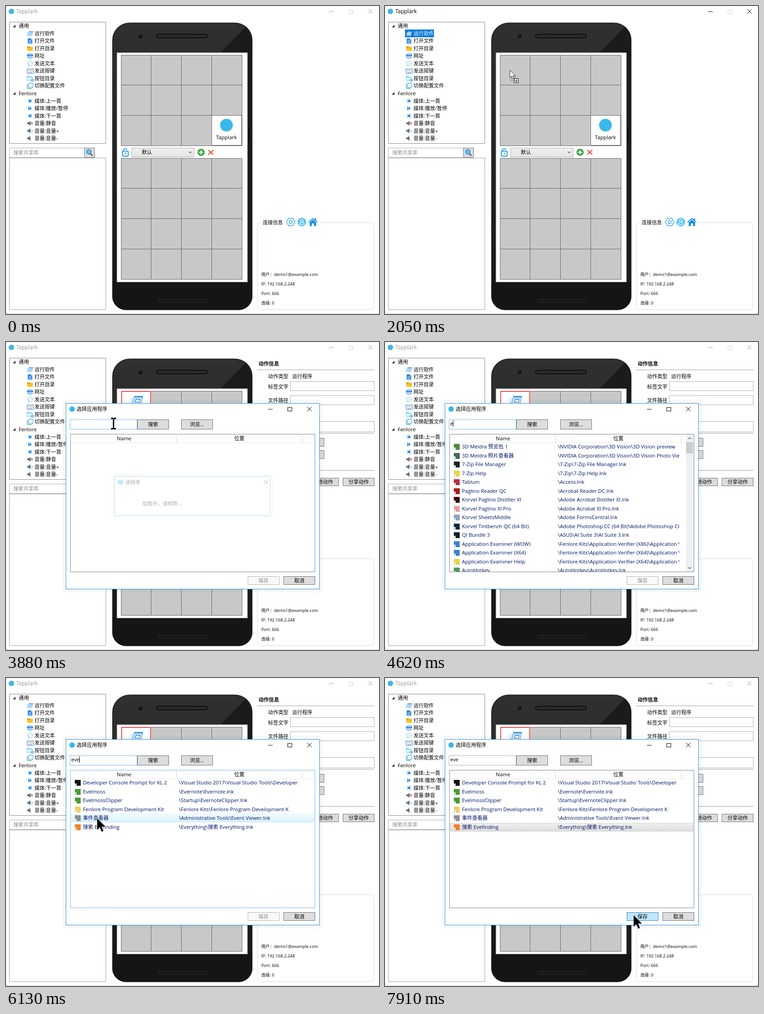
Animation of 824x680 px, one loop 8000 ms. Source, as an HTML page with a canvas:

```html
<!DOCTYPE html>
<html lang="zh">
<head>
<meta charset="utf-8">
<title>Tapplark</title>
<style>
html, body { margin: 0; width: 100%; height: 100%; overflow: hidden; background: #fff; }
canvas { display: block; }
</style>
</head>
<body>
<canvas id="stage" width="824" height="680"></canvas>
<script>
const c = document.getElementById('stage').getContext('2d');
const LOOP = 8000, BLUE = '#1296db', SKY = '#3ab8e8';
const FONT = '"Open Sans", "Noto Sans CJK SC", "Noto Sans CJK", sans-serif';

// Drawing helpers
function text(s, x, y, color = '#000', size = 11.3, align = 'left', weight = 400) {
  c.font = `${weight} ${size}px ${FONT}`;
  c.textAlign = align;
  c.fillStyle = color;
  c.fillText(s, x, y + 4);
}
function box(x, y, w, h, fill, stroke) {
  if (fill) { c.fillStyle = fill; c.fillRect(x, y, w, h); }
  if (stroke) { c.strokeStyle = stroke; c.lineWidth = 1; c.strokeRect(x + .5, y + .5, w - 1, h - 1); }
}
function line(color, width, ...p) {
  c.strokeStyle = color;
  c.lineWidth = width;
  c.beginPath();
  for (let i = 0; i < p.length; i += 2) c.lineTo(p[i], p[i + 1]);
  c.stroke();
}
function poly(fill, ...p) {
  c.fillStyle = fill;
  c.beginPath();
  for (let i = 0; i < p.length; i += 2) c.lineTo(p[i], p[i + 1]);
  c.closePath();
  c.fill();
}
function disc(x, y, r, fill, stroke, width = 1) {
  c.beginPath();
  c.arc(x, y, r, 0, 7);
  if (fill) { c.fillStyle = fill; c.fill(); }
  if (stroke) { c.strokeStyle = stroke; c.lineWidth = width; c.stroke(); }
}
function round(x, y, w, h, r, fill, stroke, width = 1) {
  c.beginPath();
  c.roundRect(x, y, w, h, r);
  if (fill) { c.fillStyle = fill; c.fill(); }
  if (stroke) { c.strokeStyle = stroke; c.lineWidth = width; c.stroke(); }
}
function fade(y0, y1, a, b) {
  const g = c.createLinearGradient(0, y0, 0, y1);
  g.addColorStop(0, a);
  g.addColorStop(1, b);
  return g;
}
function at(x, y, scale, draw) {
  c.save();
  c.translate(x, y);
  c.scale(scale, scale);
  draw();
  c.restore();
}
function button(label, x, y, w, h, mode = 'on') {
  const [fill, edge, ink] = {
    on: ['#ddd', '#707070', '#000'],
    off: ['#f9f9f9', '#adb2b5', '#838383'],
    hover: ['#bee6fd', '#3c7fb1', '#000']
  }[mode];
  box(x, y, w, h, fill, edge);
  text(label, x + w / 2, y + h / 2, ink, 11.3, 'center');
}
function caption(x, y, color, maxColor, gap) {
  line(color, 1, x - 5, y + .5, x + 5, y + .5);
  box(x + gap - 5, y - 4, 10, 9, null, maxColor);
  const k = x + 2 * gap;
  line(color, 1, k - 5, y - 5, k + 5, y + 5);
  line(color, 1, k + 5, y - 5, k - 5, y + 5);
}

// Icons, each centred on the local origin
function runIcon() {
  poly('#4a9ce0', -3, -5, 7, -5, 4.5, 5, -6, 5);
  poly('#eaf5fd', -2.8, -3, 5.7, -3, 4, 4.2, -4.9, 4.2);
  poly('#4a9ce0', -1.6, -1.8, 4.2, -1.8, 3.2, 2.8, -2.9, 2.8);
  poly('#eaf5fd', -1, -.6, 3.2, -.6, 2.6, 2, -1.7, 2);
  line('#a5d4f4', .8, -9, -1.5, -4.4, -1.5);
  line('#a5d4f4', .8, -8, 1, -5.2, 1);
  line('#a5d4f4', .8, -9, 3.5, -6, 3.5);
}
function speaker() {
  poly('#5f6f7c', -6, -2, -3, -2, 1, -5.5, 1, 5.5, -3, 2, -6, 2);
}
const icons = {
  1: runIcon,
  2() {
    poly('#2f86dc', -5, -6, 2, -6, 5, -3, 5, 6, -5, 6);
    poly('#a9d4f7', 2, -6, 5, -3, 2, -3);
    for (const y of [-1, 1.5, 4]) line('#cfe6fa', 1, -3, y, 3, y);
  },
  3() {
    poly('#e89a00', -6, -5, -1, -5, 0, -3, 6, -3, 6, 5, -6, 5);
    poly('#ffbe1a', -6, -1.5, 6.5, -1.5, 6, 5, -6, 5);
  },
  4() {
    disc(0, 0, 6, '#e6f4ff', '#2b86cf');
    box(-7, -3, 14, 6, '#2b86cf');
    text('www', 0, -1.7, '#fff', 6, 'center', 700);
  },
  5() {
    round(-6, -5, 12, 9, 4.5, '#fff', '#6cc0ec');
    line('#6cc0ec', 1, -3, 4, -4, 6, 0, 4);
    for (const x of [-3, 0, 3]) disc(x, -.5, .8, '#6cc0ec');
  },
  6() {
    box(-7, -5, 15, 11, '#f4f9ff', '#5d86b8');
    for (const y of [-2.5, -.5]) for (let x = -5; x < 6; x += 2) box(x, y, 1, 1, '#5d86b8');
    line('#5d86b8', 1, -4, 3.5, 5, 3.5);
  },
  7() {
    poly('#8fd0f2', -7, -6, -2, -6, 0, -4, 6, -4, 6, 5, -7, 5);
    box(-6, -2, 11, 6, '#dff2fd');
    disc(5, 4, 3, '#3aa5e0');
    line('#fff', 1, 3.2, 4, 6.8, 4);
    line('#fff', 1, 5, 2.2, 5, 5.8);
  },
  8() {
    round(-6, -3, 9, 9, 1, '#fff', BLUE);
    round(-4, -6, 10, 10, 1, '#fff', BLUE);
  },
  10() { box(-3, -4, 2, 8, '#1e88e5'); poly('#1e88e5', 3, -4, 3, 4, -2, 0); },
  11() { box(-4, -4, 2, 8, '#1e88e5'); poly('#1e88e5', -1, -4, -1, 4, 4, 0); },
  12() { poly('#1e88e5', -3, -4, -3, 4, 2, 0); box(1, -4, 2, 8, '#1e88e5'); },
  13() { speaker(); line('#e0392b', 1.4, 2, -2, 6, 2); line('#e0392b', 1.4, 6, -2, 2, 2); },
  14() {
    speaker();
    for (const r of [2.5, 4.5]) {
      c.beginPath(); c.arc(1, 0, r, -1, 1);
      c.strokeStyle = '#5cb8ea'; c.lineWidth = 1; c.stroke();
    }
  },
  15: speaker
};

const tree = ['通用', '运行软件', '打开文件', '打开目录', '网址', '发送文本', '发送按键', '按钮目录',
  '切换配置文件', 'Fenlore', '媒体:上一首', '媒体:播放/暂停', '媒体:下一首', '音量:静音', '音量:音量+', '音量:音量-'];

const apps = [
  ['#4f8a3c', '3D Meldra 预览包 1', '\\NVIDIA Corporation\\3D Vision\\3D Vision preview'],
  ['#3c6b5a', '3D Meldra 照片查看器', '\\NVIDIA Corporation\\3D Vision\\3D Vision Photo Viewer'],
  ['#222', '7-Zip File Manager', '\\7-Zip\\7-Zip File Manager.lnk'],
  ['#e8d34a', '7-Zip Help', '\\7-Zip\\7-Zip Help.lnk'],
  ['#b5303a', 'Tablum', '\\Access.lnk'],
  ['#a81d14', 'Paglino Reader QC', '\\Acrobat Reader DC.lnk'],
  ['#3a0d14', 'Korvel Paglino Distiller XI', '\\Adobe Acrobat Distiller XI.lnk'],
  ['#e5a09a', 'Korvel Paglino XI Pro', '\\Adobe Acrobat XI Pro.lnk'],
  ['#8fa3c0', 'Korvel SheetsMiddle', '\\Adobe FormsCentral.lnk'],
  ['#062a44', 'Korvel Tintbench QC (64 Bit)', '\\Adobe Photoshop CC (64 Bit)\\Adobe Photoshop CC (64 Bit).lnk'],
  ['#10232b', 'QI Bundle 3', '\\ASUS\\AI Suite 3\\AI Suite 3.lnk'],
  ['#3b82cc', 'Application Examiner (WOW)', '\\Fenlore Kits\\Application Verifier (X86)\\Application Verifier (WOW).lnk'],
  ['#3b82cc', 'Application Examiner (X64)', '\\Fenlore Kits\\Application Verifier (X64)\\Application Verifier (X64).lnk'],
  ['#e8d34a', 'Application Examiner Help', '\\Fenlore Kits\\Application Verifier (X64)\\Application Verifier Help.lnk'],
  ['#4f9a58', 'AutoHotkey', '\\AutoHotkey\\AutoHotkey.lnk']
];
const matches = [
  ['#111', 'Developer Console Prompt for KL 2', '\\Visual Studio 2017\\Visual Studio Tools\\Developer'],
  ['#4a9c2f', 'Evelmoss', '\\Evernote\\Evernote.lnk'],
  ['#4a9c2f', 'EvelmossClipper', '\\Startup\\EvernoteClipper.lnk'],
  ['#f0cf63', 'Fenlore Program Development Kit', '\\Fenlore Kits\\Fenlore Program Development K'],
  ['#8a9097', '事件查看器', '\\Administrative Tools\\Event Viewer.lnk'],
  ['#f08228', '搜索 Evefinding', '\\Everything\\搜索 Everything.lnk']
];

function drawTitle(active) {
  disc(12, 12, 6, SKY);
  text('Tapplark', 23, 12, active ? '#000' : '#999', 11.8);
  caption(719, 12, active ? '#000' : '#a0a0a0', '#d8d8d8', 43);
  line('#c8c8c8', 1, 0, 679.5, 824, 679.5);
}

function drawTree(selected) {
  box(7, 35, 214, 269, null, '#828790');
  tree.forEach((name, i) => {
    const y = 44.2 + i * 16.53, head = i % 9 === 0;
    if (head) {
      poly('#333', 21, y - 3, 21, y + 3, 15, y + 3);
      text(name, 28, y, '#000', 11.4);
      return;
    }
    const on = selected && i === 1;
    if (on) box(44, 52, 64, 17, '#0078d7');
    at(53, y, 1, icons[i]);
    text(name, 63, y, on ? '#fff' : '#000', 11.2);
  });
  box(7, 335, 214, 336, null, '#a0a3a8');
  box(7, 313, 167, 22, '#fff', '#abadb3');
  text('搜索共享库', 16, 324, '#8c8c8c', 11.2);
  box(173, 313, 23, 22, '#ddd', '#707070');
  line('#37474f', 2.4, 186.5, 326, 191, 330.5);
  disc(183, 322, 5, '#6cc3f5', '#1976d2', 1.5);
}

function cells(y, rows) {
  const s = 66.7;
  for (let r = 0; r < rows; r++) for (let k = 0; k < 4; k++) {
    const x0 = Math.round(253.5 + k * s), y0 = Math.round(y + r * s);
    box(x0, y0, 68, 68, '#c8c8c8', '#666');
  }
}

function drawPhone(dropped) {
  round(235, 37, 309, 634, [38, 38, 30, 30], fade(37, 671, '#303030', '#141414'), '#555', 1);
  c.save();
  c.clip();
  poly('#1b1b1b', 538, 37, 560, 37, 560, 680, 534, 680, 534, 103, 474, 103);
  poly('#151515', 230, 609, 550, 609, 550, 680, 230, 680);
  c.restore();
  round(236, 38, 307, 632, [37, 37, 29, 29], null, '#1a1a1a', 1);
  round(333, 62.5, 112, 8, 4, '#2a2a2a', '#050505', 1.6);
  disc(297, 67, 4, '#0b0b12');
  disc(297, 66.5, 1.4, '#3a4468');
  round(337, 647.5, 109, 7, 3.5, '#171717', '#2c2c2c', 1);
  line('#050505', 1.5, 537, 268, 537, 299);
  round(245, 103, 288.5, 506.5, 0, '#fff', '#8c8c8c');
  cells(107.5, 3);
  cells(335.5, 4);
  box(454, 241, 67, 67, '#fff', '#666');
  disc(487, 263, 14, SKY);
  text('Tapplark', 487, 289.5, '#000', 11.6, 'center');
  if (dropped) {
    box(254, 108, 67, 66, '#fff');
    c.strokeStyle = '#ee4a45';
    c.lineWidth = 2;
    c.strokeRect(255.5, 109, 64, 64);
    at(289.5, 128.5, 1.9, runIcon);
  }

  round(257, 320.5, 13, 11, 1, '#fff', BLUE, 1.8);
  line(BLUE, 1.8, 263.5, 324, 263.5, 328);
  c.beginPath();
  c.arc(263, 318.5, 3.6, Math.PI, Math.PI * 1.95);
  c.lineWidth = 1.8;
  c.stroke();
  line(BLUE, 1.8, 259.4, 318, 259.4, 321);
  box(277, 313, 139, 21, fade(313, 334, '#f0f0f0', '#e4e4e4'), '#acacac');
  text('默认', 300, 322.5, '#000', 11.3);
  line('#555', 1.2, 404, 321.5, 407, 324.5, 410, 321.5);
  disc(431, 323, 8, '#43a94b');
  line('#fff', 2.2, 426.5, 323, 435.5, 323);
  line('#fff', 2.2, 431, 318.5, 431, 327.5);
  line('#ea4030', 2, 447, 318, 458, 328);
  line('#ea4030', 2, 458, 318, 447, 328);
}

function drawInfo() {
  round(555.5, 478.5, 257, 192, 3, null, '#d5dfe5');
  box(562, 470, 130, 16, '#fff');
  text('连接信息', 567, 477.5, '#000', 11.2);
  c.beginPath();
  for (let i = 0; i <= 48; i++) {
    const a = i * Math.PI / 24, r = 8.6 + .9 * Math.tanh(3 * Math.cos(a * 6));
    c.lineTo(629 + r * Math.cos(a), 477 + r * Math.sin(a));
  }
  c.strokeStyle = '#2fa8e6';
  c.lineWidth = 1.4;
  c.stroke();
  disc(629, 477, 3.2, null, '#2fa8e6', 1.4);
  disc(653.5, 477, 9.6, '#5cc4f0');
  disc(653.5, 474, 3, null, '#fff', 1.2);
  c.beginPath();
  c.arc(653.5, 482.5, 5, Math.PI, 0);
  c.closePath();
  c.stroke();
  poly('#1490dc', 671, 478, 678, 472, 685, 478, 685, 486, 680.5, 486, 680.5, 480, 675.5, 480, 675.5, 486, 671, 486);
  line('#1490dc', 2, 668.5, 477.5, 678, 469, 687.5, 477.5);
  box(682, 469, 3, 5, '#1490dc');
  ['用户：demo1@example.com', 'IP: 192.168.2.248', 'Port: 666', '连接: 0']
    .forEach((s, i) => text(s, 564, 592 + i * 21.1, '#000', 9.35));
}

function drawPanel() {
  text('动作信息', 558, 47.5, '#000', 11.3, 'left', 700);
  for (const y of [61.5, 201.5, 283.5]) line('#a0a0a0', 1, 554, y, 814, y);
  text('运行程序', 632, 75.5, '#000', 11.2);
  [['动作类型', 75.5], ['标签文字', 98.5], ['文件路径', 129], ['附加参数', 187]]
    .forEach(([s, y]) => text(s, 579, y, '#000', 11.2));
  for (const [y, h] of [[87, 21], [118, 21], [175, 24]]) box(628, y, 186, h, '#fff', '#abadb3');
  button('选择...', 628, 144, 34, 17);
  box(561, 212, 60, 60, '#fff', '#b5b8bc');
  at(592, 231, 1.9, runIcon);
  button('更改图标...', 628, 212, 75, 19);
  button('去除图标', 628, 239, 75, 19);
  button('保存/结束编辑', 563, 300, 93, 18);
  button('删除动作', 665, 300, 70, 18);
  button('分享动作', 744, 300, 70, 18);
}

// White window with a soft band of shadow around it
function frameBox(x, y, w, h, edge, shade) {
  round(x - 3.5, y - 3.5, w + 7, h + 7, 6, null, `rgba(0,0,0,${shade})`, 7);
  box(x, y, w, h, '#fff', edge);
}

function drawRows(rows, hover, picked) {
  c.save();
  c.beginPath();
  c.rect(143, 222, 538, 285);
  c.clip();
  rows.forEach(([color, name, path], i) => {
    const y = 231 + i * 19.5, top = Math.round(y - 9);
    if (i === hover || i === picked) {
      const [a, b, edge] = i !== picked ? ['#f5fcff', '#d5f1ff', '#d3effc']
        : i === hover ? ['#eaf9ff', '#c9edfd', '#98ddfb'] : ['#f0f0f0', '#dcdcdc', '#d5d5d5'];
      box(144, top, 537, 19, fade(top, top + 19, a, b), edge);
    }
    box(152, Math.round(y) - 6, 13, 13, color);
    box(151, y + 2, 5, 5, '#fff');
    line('#2a78c8', 1, 152, y + 6, 155, y + 3);
    for (const [s, x, w] of [[name, 170, 204], [path, 382, 268]]) {
      c.save();
      c.beginPath();
      c.rect(x, y - 10, w, 20);
      c.clip();
      text(s, x, y, '#001466', 11.35);
      c.restore();
    }
  });
  c.restore();
  if (rows.length > 14) {
    box(665, 204, 17, 303, '#f0f0f0');
    box(665, 221, 15, 25, '#cdcdcd');
    line('#606060', 1.2, 669.5, 214.5, 673, 211, 676.5, 214.5);
    line('#606060', 1.2, 669.5, 497, 673, 500.5, 676.5, 497);
  }
}

function drawPicker(t, mouse) {
  const active = t >= 3880, picked = t >= 6970, ink = active ? '#000' : '#999';
  frameBox(132, 135, 561, 411, active ? '#2f8fd8' : '#a6a6a6', t < 2470 ? .08 : .03);
  disc(146, 148, 6, SKY);
  text('选择应用程序', 156, 148, ink, 11.3);
  caption(584, 148, ink, ink, 43);

  const over = (x, y, w, h) => mouse && mouse.x >= x && mouse.x < x + w && mouse.y >= y && mouse.y < y + h;
  const focused = t >= 3010 && !picked;
  box(141, 171, 149, 22, '#fff', focused ? '#7eb4ea' : '#abadb3');
  const query = 'eve'.slice(0, (t >= 4410) + (t >= 4930) + (t >= 5590));
  text(query, 144, 180, '#000', 11.35);
  if (query && !picked) {
    const x = 144.5 + Math.round(c.measureText(query).width);
    line('#000', 1, x, 173, x, 187);
  }
  button('搜索', 290, 171, 70, 22);
  button('浏览...', 387, 171, 70, 22);

  const inList = t > 5590 && over(142, 203, 541, 305);
  box(142, 203, 541, 305, null, inList ? '#7eb4ea' : '#828790');
  text('Name', 261, 212.5, '#000', 11.35, 'center');
  text('位置', 515.5, 212.5, '#000', 11.3, 'center');
  line('#d5d5d5', 1, 376.5, 205, 376.5, 222);
  line('#d5d5d5', 1, 654.5, 205, 654.5, 222);
  line('#e8e8e8', 1, 143, 222.5, 682, 222.5);

  if (t >= 4090) {
    const rows = t < 5050 ? apps : t < 5590 ? [apps[0], ...matches] : matches;
    const hover = inList ? Math.floor((mouse.y - 221.5) / 19.5) : -1;
    drawRows(rows, hover, picked ? 5 : -1);
  }
  button('保存', 534, 517, 70, 19, !picked ? 'off' : over(534, 517, 70, 19) ? 'hover' : 'on');
  button('取消', 613, 517, 70, 19);
  for (let i = 0; i < 3; i++) for (let k = 0; k <= i; k++) box(689 - k * 3, 537 + i * 3, 1, 1, '#aaa');
}

function drawLoading(opening) {
  const ink = opening ? '#777' : '#000';
  frameBox(239, 296, 345, 88, opening ? '#999' : '#2f8fd8', opening ? .5 : .04);
  disc(253, 309.5, 6, SKY);
  text('请稍等', 263, 309.5, ink, 11.2);
  text('加载中，请稍等...', 301, 357, ink, 11.2);
  if (opening) return;
  line(ink, 1, 570, 305, 579, 314);
  line(ink, 1, 579, 305, 570, 314);
}

// Pointer legs: start, end, steps, from x,y, to x,y
const legs = [
  [100, 900, 9, 649, 673, 74, 62],
  [1000, 1100, 2, 74, 62, 71, 57],
  [1415, 2050, 7, 71, 57, 276, 142],
  [2790, 3010, 3, 275, 141, 238, 180],
  [5698, 6130, 5, 240, 185, 201, 309],
  [6210, 6340, 2, 201, 309, 203, 313],
  [6430, 6540, 2, 203, 313, 203, 323],
  [7170, 7910, 8, 203, 323, 549, 523]
];
function pointer(t) {
  if (t < 100 || (t >= 4410 && t < 5698)) return null;
  const [t0, t1, n, x0, y0, x1, y1] = legs.filter(l => l[0] <= t).pop();
  const step = Math.floor((t - t0) / (t1 - t0) * (n - 1) + 1e-6);
  const p = Math.min(1, (step + 1) / n), e = p * p * (3 - 2 * p);
  return { x: Math.round(x0 + (x1 - x0) * e), y: Math.round(y0 + (y1 - y0) * e) };
}

function arrow(fill, edge, width) {
  const p = [0, 0, 0, 16.5, 3.8, 13, 6.3, 19, 9, 17.8, 6.5, 12, 11.8, 12];
  c.lineJoin = 'miter';
  poly(fill, ...p);
  c.strokeStyle = edge;
  c.lineWidth = width;
  c.stroke();
}
function drawPointer(t, { x, y }) {
  if (t >= 1310 && t < 2260) {
    c.setLineDash([1, 1]);
    box(x + 2, y + 14, 11, 9, null, '#444');
    c.setLineDash([]);
    at(x, y, 1, () => arrow('#fff', '#000', .8));
    box(x + 9, y + 18, 10, 10, '#fff', '#000');
    line('#000', 1, x + 11, y + 23.5, x + 17, y + 23.5);
    line('#000', 1, x + 14, y + 20, x + 14, y + 26);
  } else if (t > 2600 && y >= 171 && y < 193 && x < 290) {
    box(x - 2, y - 11, 3, 23, '#000');
    for (const k of [-13, 10]) {
      box(x - 6, y + k, 5, 3, '#000');
      box(x, y + k, 5, 3, '#000');
    }
  } else {
    at(x, y, 1.62, () => arrow('#000', '#fff', .35));
  }
}

function draw(t) {
  const mouse = pointer(t), dropped = t >= 2260;
  box(0, 0, 824, 680, '#fff');
  drawTitle(t >= 1310 && t < 2380);
  drawTree(t >= 1310 && t < 2260);
  drawPhone(dropped);
  drawInfo();
  if (dropped) drawPanel();
  if (t >= 2380) {
    const opening = t < 2470;
    c.save();
    if (opening) {
      c.globalAlpha = .82;
      c.translate(412.5, 340);
      c.scale(.989, .989);
      c.translate(-412.5, -340);
    }
    drawPicker(t, mouse);
    c.restore();
    const alpha = opening ? .14 : t < 2600 ? .75 : t < 3880 ? 1 : t < 3980 ? .3 : t < 4090 ? .08 : 0;
    if (alpha) {
      c.save();
      c.globalAlpha = alpha;
      drawLoading(opening);
      c.restore();
    }
  }
  if (mouse) drawPointer(t, mouse);
}

const start = performance.now();
function tick() {
  draw((performance.now() - start) % LOOP);
  requestAnimationFrame(tick);
}
tick();
</script>
</body>
</html>
```
